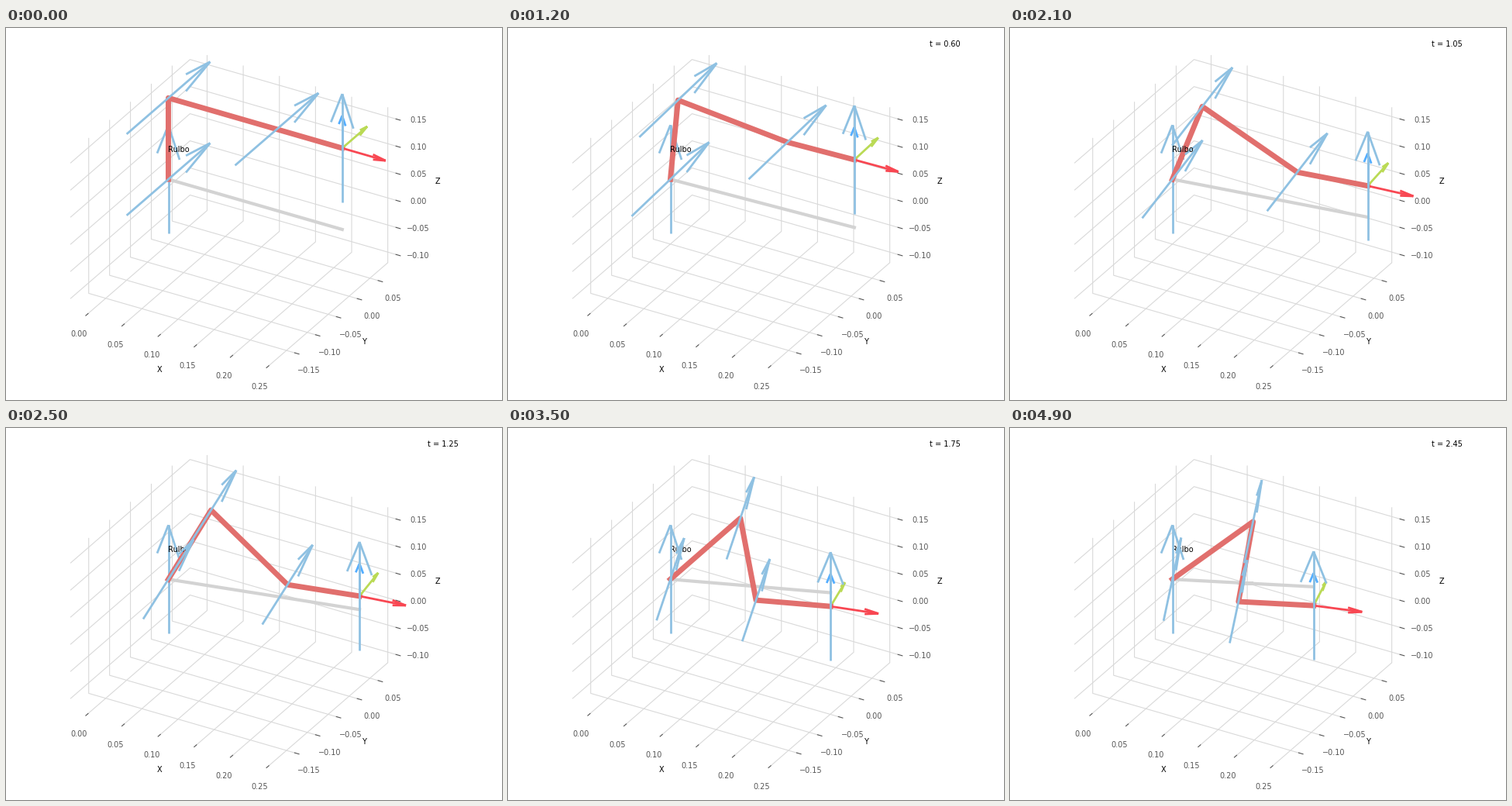
These frames come from a looping animation (640 px wide and 480 px high, 5 s). A matplotlib script:

```python
import numpy as np
import matplotlib.pyplot as plt
from matplotlib.animation import FuncAnimation
from matplotlib.collections import LineCollection

plt.rcParams["font.family"] = "DejaVu Sans"
plt.rcParams["font.size"] = 7

FRAMES, INTERVAL, STEP = 50, 100, 0.05

# Orthographic view: elevation 30, azimuth -60, vertical axis at 3/4 scale.
SCALE = 1077
ORIGIN = np.array([209.5, 195.2])
C30 = np.cos(np.pi / 6)
PROJ = SCALE * np.array([[C30, 0.25], [0.5, -C30 / 2], [0, -0.75 * C30]])
TOWARD_VIEWER = np.array([C30 / 2, -0.75, 0.375])

SPAN = 0.2867
LOW = np.array([-0.0236, -0.1939, -0.1195])
HIGH = LOW + SPAN

# Arm geometry and final pose.
UPPER, FORE, HAND = 0.15, 0.15, 0.0905
TURN, LEAN, PITCH, YAW = 0.418, 0.705, 1.688, 0.27
UP = np.array([0.0, 0.0, 1.0])
EAST = np.array([1.0, 0.0, 0.0])

LINK, AXIS, SHADOW = "#E16F6D", "#8FC1E2", "lightgrey"
RED, GREEN, BLUE = "#F84752", "#BADA55", "#54AEFF"
GRID, TICK = "#d9d9d9", "#555555"

fig = plt.figure(figsize=(6.4, 4.8), dpi=100, facecolor="white")
ax = fig.add_axes([0, 0, 1, 1])
ax.set_xlim(0, 640)
ax.set_ylim(480, 0)
ax.axis("off")


def project(points):
    return ORIGIN + np.asarray(points) @ PROJ


def heading(angle):
    return np.array([np.cos(angle), np.sin(angle), 0.0])


def label(x, y, text, color=TICK):
    ax.text(x, y, text, color=color, ha="center", va="center")


def draw_box():
    grid, ticks = [], []
    (x0, y0, z0), (x1, y1, z1) = LOW, HIGH

    def add_tick(edge, axis, sign, value, offset):
        step = np.zeros(3)
        step[axis] = sign * SPAN / 12
        ticks.append(project([edge - 0.1 * step, edge + 0.2 * step]))
        x, y = project(edge) + offset
        label(x, y, f"{value:.2f}".replace("-", "\u2212"))

    for i in range(6):
        x = 0.05 * i
        grid.append(project([[x, y0, z0], [x, y1, z0], [x, y1, z1]]))
        add_tick(np.array([x, y0, z0]), 1, -1, x, (-10.7, 26.2))
    for i in range(-3, 2):
        y = 0.05 * i
        grid.append(project([[x1, y, z0], [x0, y, z0], [x0, y, z1]]))
        add_tick(np.array([x1, y, z0]), 0, 1, y, (17, 22.6))
    for i in range(-2, 4):
        z = 0.05 * i
        grid.append(project([[x0, y0, z], [x0, y1, z], [x1, y1, z]]))
        add_tick(np.array([x1, y1, z]), 0, 1, z, (27.3, 1.3))

    ax.add_collection(LineCollection(grid, colors=GRID, linewidths=0.8, zorder=0.5))
    ax.add_collection(LineCollection(ticks, colors=TICK, linewidths=0.8, zorder=0.6))
    label(198, 441.5, "X", "black")
    label(461.5, 405.5, "Y", "black")
    label(557, 198, "Z", "black")


def arrow(start, direction, length, side):
    """Shaft and two barbs at 15 degrees, spread along side."""
    tip = start + length * direction
    cos, sin = np.cos(np.pi / 12), np.sin(np.pi / 12)
    barbs = [tip - 0.3 * length * (cos * direction + s * sin * side) for s in (1, -1)]
    return np.array([[start, tip], [tip, barbs[0]], [tip, barbs[1]]])


def joint_axis(center, direction, side):
    return arrow(center - 0.1 * direction, direction, 0.2, side)


def pose(frame):
    """Joint positions and all arrows at a given frame."""
    u = frame / (FRAMES - 1)
    s = u**3 * (10 - 15 * u + 6 * u * u)
    turn, lean, pitch, yaw = (s * a for a in (TURN, LEAN, PITCH, YAW))
    out = heading(turn)
    across = heading(turn + np.pi / 2)

    base = np.zeros(3)
    shoulder = UPPER * (np.sin(lean) * out + np.cos(lean) * UP)
    elbow = shoulder + FORE * (np.cos(pitch) * out - np.sin(pitch) * UP)
    hand = elbow + HAND * out
    arrows = [
        joint_axis(base, UP, EAST),
        joint_axis(base, across, UP),
        joint_axis(shoulder, across, UP),
        joint_axis(elbow, across, UP),
        joint_axis(hand, UP, out),
        arrow(hand, heading(yaw), 0.06, UP),
        arrow(hand, heading(yaw + np.pi / 2), 0.06, UP),
        arrow(hand, UP, 0.06, out),
    ]
    return np.array([base, shoulder, elbow, hand]), arrows


draw_box()
shadow, = ax.plot([], [], color=SHADOW, linewidth=3, zorder=2)
links, = ax.plot([], [], color=LINK, linewidth=5, zorder=2)
ax.text(*project([0, 0, 0.05]), "Rulbo", color="black", zorder=3)
clock = fig.text(0.85, 0.95, "", color="black")
arrow_art = [
    ax.add_collection(LineCollection([], colors=color, linewidths=2))
    for color in [AXIS] * 5 + [RED, GREEN, BLUE]
]


def update(frame):
    joints, arrows = pose(frame)
    links.set_data(*project(joints).T)
    shadow.set_data(*project(joints * [1, 1, 0]).T)

    # Nearer arrows cover farther ones; the farthest lies under the links.
    nearness = [(a @ TOWARD_VIEWER).max() for a in arrows]
    for rank, i in enumerate(np.argsort(nearness, kind="stable")):
        arrow_art[i].set_segments(project(arrows[i]))
        arrow_art[i].set_zorder(1.5 + rank)

    clock.set_text(f"t = {frame * STEP:.2f}" if frame else "")
    return [shadow, links, clock, *arrow_art]


anim = FuncAnimation(fig, update, frames=FRAMES, interval=INTERVAL, repeat=True)
plt.show()
```
